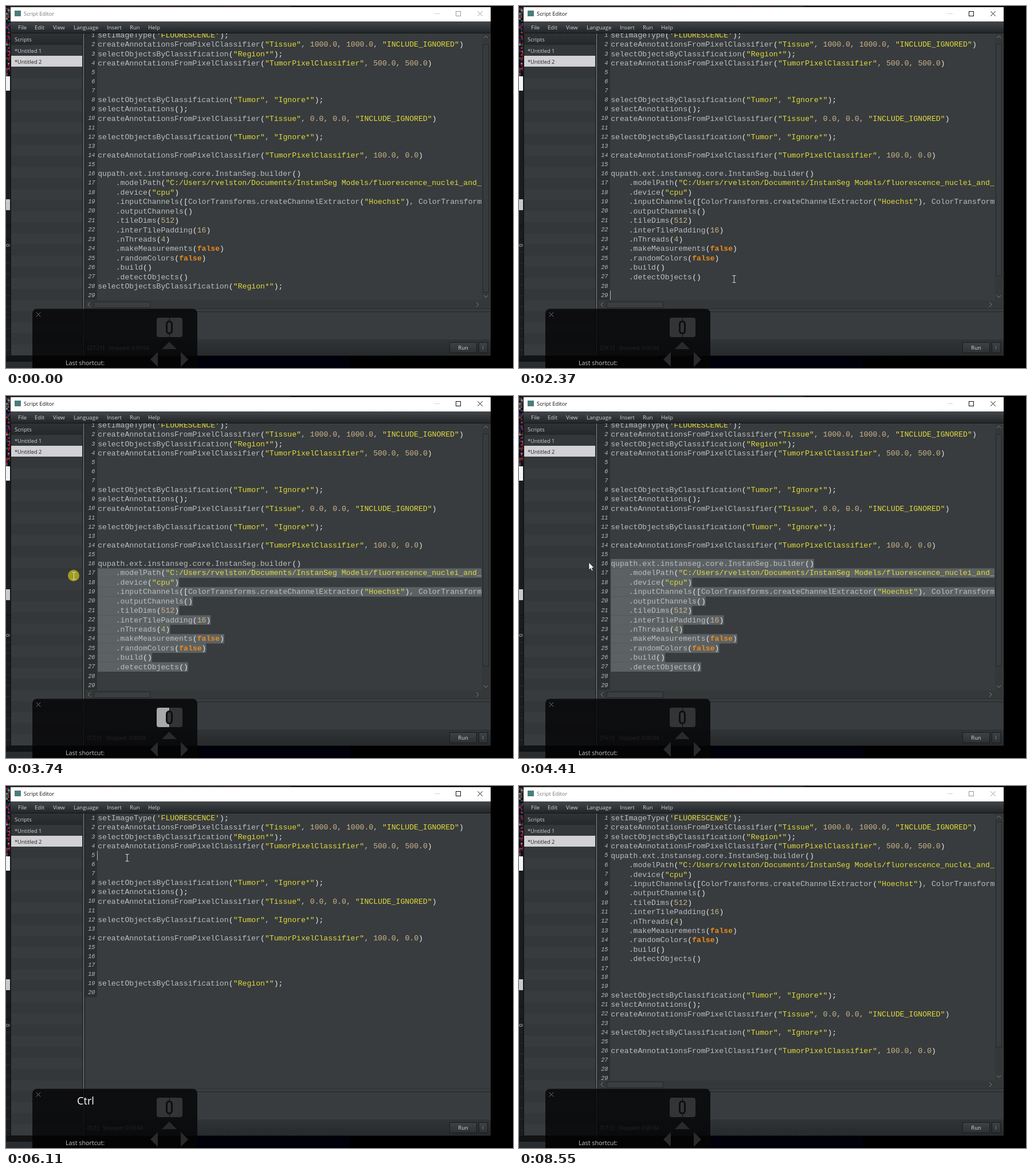
An HTML page with a canvas that plays this animation: 885 by 633 pixels, repeating every 8620 ms.

```html
<!DOCTYPE html>
<html lang="en">
<head>
<meta charset="utf-8">
<title>Script Editor</title>
<style>
html, body { margin: 0; width: 100%; height: 100%; overflow: hidden; background: #000; }
canvas { display: block; width: 885px; height: 633px; }
</style>
</head>
<body>
<canvas id="stage" width="885" height="633"></canvas>
<script>
const ctx = document.getElementById('stage').getContext('2d');
const LOOP = 8620;
const UI = '"Open Sans", "Noto Sans", sans-serif';
const MONO = '"Liberation Mono", "Courier New", monospace';
const CODE_X = 160.2, CHAR = 7.885, CODE_SIZE = 13.14;
const TOP = 48, ROW = 16.42, BLANK = 15.7, VIEW = 466;

// ---------- script text ----------
const open = [
  "setImageType('FLUORESCENCE');",
  'createAnnotationsFromPixelClassifier("Tissue", 1000.0, 1000.0, "INCLUDE_IGNORED")',
  'selectObjectsByClassification("Region*");',
  'createAnnotationsFromPixelClassifier("TumorPixelClassifier", 500.0, 500.0)'
];
const middle = [
  'selectObjectsByClassification("Tumor", "Ignore*");',
  'selectAnnotations();',
  'createAnnotationsFromPixelClassifier("Tissue", 0.0, 0.0, "INCLUDE_IGNORED")',
  '',
  'selectObjectsByClassification("Tumor", "Ignore*");',
  '',
  'createAnnotationsFromPixelClassifier("TumorPixelClassifier", 100.0, 0.0)',
  ''
];
const builder = [
  'qupath.ext.instanseg.core.InstanSeg.builder()',
  '    .modelPath("C:/Users/rvelston/Documents/InstanSeg Models/fluorescence_nuclei_and_cells")',
  '    .device("cpu")',
  '    .inputChannels([ColorTransforms.createChannelExtractor("Hoechst"), ColorTransforms.create',
  '    .outputChannels()',
  '    .tileDims(512)',
  '    .interTilePadding(16)',
  '    .nThreads(4)',
  '    .makeMeasurements(false)',
  '    .randomColors(false)',
  '    .build()',
  '    .detectObjects()'
];
const tail = ['selectObjectsByClassification("Region*");', ''];
const gap = n => Array(n).fill('');

const before = n => makeDoc([...open, ...gap(3), ...middle, ...builder, ...gap(n), ...tail], 5);
const after = n => makeDoc([...open, ...builder, ...gap(n), ...middle, ...gap(3), ...tail], 0);
const cut = makeDoc([...open, ...gap(3), ...middle, ...gap(3), ...tail], 0);

function makeDoc(lines, scroll) {
  const tops = [];
  let y = TOP - scroll;
  for (const s of lines) { tops.push(y); y += s ? ROW : BLANK; }
  tops.push(y);
  return { lines, tops, scroll, height: y + scroll - TOP };
}

// time, document, caret line, caret column
const states = [
  [0, before(0), 27, 20], [2160, before(1), 28, 0], [2300, before(2), 29, 0],
  [4670, cut, 16, 0], [5580, cut, 5, 0], [6180, after(2), 16, 20], [7110, after(3), 17, 0]
];
const last = (list, t) => list.filter(s => s[0] <= t).pop();
const within = (t, spans) => spans.some(([a, b]) => t >= a && t < b);

// ---------- motion ----------
const pointerPath = [
  [260, 515, 552], [680, 371, 468], [890, 375, 477], [2830, 375, 477], [2970, 345, 476],
  [3110, 290, 462], [3320, 193, 399], [3670, 120, 319], [3740, 118, 314], [3950, 120, 293],
  [4210, 122, 292], [4950, 122, 292], [5510, 211, 125], [7590, 211, 125], [8220, 830, 640]
];
const headPath = [
  [2970, 345, 476], [3110, 318, 472], [3320, 217, 410], [3670, 120, 327],
  [3740, 118, 312], [3880, 118, 294]
];
const presses = [[1150, 1350], [2970, 4210], [5580, 5720]];
const caretOn = [[1150, 1960], [2160, 2830], [4670, 5170], [5650, 6650], [7110, 7590]];
const DRAG = [2970, 4670];

function along(path, t) {
  let i = 0;
  while (i < path.length - 2 && t > path[i + 1][0]) i++;
  const a = path[i], b = path[i + 1];
  const k = Math.min(1, Math.max(0, (t - a[0]) / (b[0] - a[0])));
  return [a[1] + (b[1] - a[1]) * k, a[2] + (b[2] - a[2]) * k];
}
function stepped(t) {
  const start = last([[0], [260], [2830], [4670], [7590]], t)[0];
  return start + Math.floor((t - start + 10) / 70) * 70;
}

// ---------- drawing helpers ----------
function box(x, y, w, h, fill) { ctx.fillStyle = fill; ctx.fillRect(x, y, w, h); }
function ramp(x, y, w, h, a, b) {
  const g = ctx.createLinearGradient(0, y, 0, y + h);
  g.addColorStop(0, a);
  g.addColorStop(1, b);
  box(x, y, w, h, g);
}
function frame(x, y, w, h, color) {
  ctx.strokeStyle = color;
  ctx.lineWidth = 1;
  ctx.strokeRect(x + .5, y + .5, w - 1, h - 1);
}
function text(s, x, y, size, color, align = 'left') {
  ctx.font = `${size}px ${UI}`;
  ctx.textAlign = align;
  ctx.fillStyle = color;
  ctx.fillText(s, x, y);
}
function line(points, color, width = 1) {
  ctx.strokeStyle = color;
  ctx.lineWidth = width;
  ctx.beginPath();
  points.forEach(([x, y], i) => i ? ctx.lineTo(x, y) : ctx.moveTo(x, y));
  ctx.stroke();
}
function shape(points, color) {
  ctx.fillStyle = color;
  ctx.beginPath();
  points.forEach(([x, y]) => ctx.lineTo(x, y));
  ctx.closePath();
  ctx.fill();
}
function round(x, y, w, h, r, color) {
  ctx.fillStyle = color;
  ctx.beginPath();
  ctx.roundRect(x, y, w, h, r);
  ctx.fill();
}
function cross(x, y, r, color) {
  line([[x - r, y - r], [x + r, y + r]], color);
  line([[x + r, y - r], [x - r, y + r]], color);
}

// ---------- parts ----------
function drawDesktop() {
  box(0, 0, 885, 633, '#000');
  box(334, 613, 266, 20, '#01010c');
  box(0, 0, 8, 633, '#1a1d1e');
  let seed = 7;
  const rnd = () => (seed = seed * 16807 % 2147483647) / 2147483647;
  const tints = ['#0a0c1c', '#8e161c', '#182050', '#a8242a', '#1c0c14', '#24503a', '#7c7c8c', '#0c1020'];
  const tint = () => tints[Math.floor(rnd() * tints.length)];
  for (let y = 0; y < 122; y += 3)
    for (let x = 0; x < 8; x += 3) box(x, y, Math.min(3, 8 - x), 3, tint());
  for (let x = 8; x < 495; x += 3) box(x, 0, 3, 1, rnd() < .5 ? '#5a1418' : '#15301c');
  box(0, 123, 8, 25, '#f4f4f4');
  box(0, 338, 8, 19, '#c9c9c9');
  for (const y of [383, 387, 407]) box(0, y, 8, 1, '#0c0d0e');
  for (let y = 430; y < 610; y += 19) box(0, y, 8, 1, '#2b2e30');
  text('or', 0, 421, 9.5, '#c8c8c8');
  box(0, 612, 46, 21, '#111314');
  box(0, 622, 46, 11, '#2a2d2f');
}

function drawWindow(active) {
  box(7, 1, 839, 611, '#141617');
  box(8, 2, 838, 25, '#fff');
  const ink = active ? '#111' : '#999';
  box(15, 8, 11, 10, '#4b7d7b');
  text('Script Editor', 31, 17, 9.35, active ? '#111' : '#777');
  box(748, 13, 9, 1, '#d0d0d0');
  frame(785, 9, 9, 9, ink);
  cross(827.5, 13.5, 4.2, ink);

  ramp(8, 27, 838, 20, '#43474a', '#232628');
  const menus = { File: 21, Edit: 50, View: 82, Language: 118, Insert: 176, Run: 216, Help: 248 };
  for (const name in menus) text(name, menus[name], 40.5, 9.6, '#d2d3d4');

  box(9, 48, 124, 563, '#373b3d');
  ramp(9, 48, 124, 20, '#303335', '#25282a');
  text('Scripts', 15, 62, 9.5, '#d0d1d2');
  for (let i = 0; i < 28; i++) {
    const y = 68 + i * 19.4;
    box(9, y, 124, Math.min(19.4, 611 - y), i % 2 ? '#373b3d' : '#33373a');
  }
  box(9, 87, 124, 19, '#d2d1d4');
  text('*Untitled 1', 15, 81.5, 9.25, '#d0d1d2');
  text('*Untitled 2', 15, 100.5, 9.25, '#222');

  box(133, 48, 5, 563, '#1d2021');
  box(134, 48, 3, 563, '#3c4042');
  box(135, 48, 1, 563, '#6c7072');
  box(138, 48, 708, 482, '#383c3e');
  box(138, 530, 708, 5, '#1d2021');
  box(138, 531, 708, 1, '#5f6365');
  box(138, 533, 708, 1, '#4a4e50');
  box(138, 535, 708, 48, '#383c3e');
  ramp(138, 583, 708, 28, '#303436', '#272a2c');
  ramp(774, 588, 48, 19, '#3f4345', '#2d3032');
  frame(774, 588, 48, 19, '#1a1c1d');
  text('Run', 798, 601, 9.4, '#dcdcdc', 'center');
  ramp(825, 588, 16, 19, '#3f4345', '#2d3032');
  frame(825, 588, 16, 19, '#1a1c1d');
  for (const y of [595, 597, 599]) box(832, y, 1, 1, '#b5b5b5');
}

function drawBars(doc) {
  const grey = '#7c8082', edge = '#25282a';
  box(831, 48, 14, 467, '#343839');
  line([[834, 56], [837.5, 52], [841, 56]], grey);
  line([[834, 506], [837.5, 510], [841, 506]], grey);
  const y = 62 + 439 * doc.scroll / doc.height, h = 439 * VIEW / doc.height;
  box(832, y, 11, h, '#373b3d');
  frame(832, Math.round(y), 11, Math.round(h), edge);
  box(138, 515, 707, 15, '#343839');
  line([[147, 518], [143, 522], [147, 526]], grey);
  line([[821, 518], [825, 522], [821, 526]], grey);
  box(153, 517, 99, 11, '#3a3e40');
  frame(153, 517, 99, 11, edge);
}

const TOKEN = /"[^"]*"|'[^']*'|\b\d+(?:\.\d+)?\b|\bfalse\b|[()[\]{};]|[^"'()[\]{};\d]+?(?=\bfalse\b|["'()[\]{};\d]|$)/g;
function style(tok) {
  if (/^["']/.test(tok)) return ['', '#e2da3c'];
  if (/^\d/.test(tok)) return ['', '#cdb388'];
  if (tok === 'false') return ['bold ', '#ec8a1c'];
  if (/^[()[\]{};]/.test(tok)) return ['', '#e6e7e7'];
  return ['', '#bcbebf'];
}

function drawCode(doc, bars, sel, caret) {
  const { lines, tops } = doc;
  ctx.save();
  ctx.beginPath();
  ctx.rect(138, TOP, bars ? 692 : 708, bars ? VIEW : 482);
  ctx.clip();
  box(138, TOP, 21, tops[lines.length] - TOP, '#2c2f31');
  lines.forEach((s, i) => {
    const y = tops[i], n = i + 1;
    if (sel && n >= sel.line && n <= 27) {
      const from = n === sel.line ? sel.col : 0;
      box(CODE_X + from * CHAR, y, (s.length - from) * CHAR, ROW, '#5c6264');
    }
    ctx.font = `italic 10.3px ${MONO}`;
    ctx.textAlign = 'right';
    ctx.fillStyle = '#b9bbbc';
    ctx.fillText(n, 155.5, Math.round(y + 10.8));
    ctx.textAlign = 'left';
    for (const m of s.matchAll(TOKEN)) {
      const [weight, color] = style(m[0]);
      ctx.font = `${weight}${CODE_SIZE}px ${MONO}`;
      ctx.fillStyle = color;
      ctx.fillText(m[0], CODE_X + m.index * CHAR, Math.round(y + 12));
    }
  });
  if (caret) box(Math.floor(CODE_X + caret.col * CHAR - .5), tops[caret.line - 1], 1, ROW, '#b4b6b7');
  ctx.restore();
}

function drawStatus(pos) {
  const s = `[${pos.line}:${pos.col + 1}]`;
  text(s, 142, 601, 9.3, '#c4c4c4');
  const x = 142 + ctx.measureText(s).width + 8;
  text('Stopped: 0:00:04', x, 601, 8.95, '#c4c4c4');
}

function drawKeys(t, pressed) {
  round(46, 529.5, 288, 120, 8, 'rgba(5,6,7,.83)');
  cross(56.5, 539.5, 3.8, '#77797a');
  const dim = '#323435', arrow = '#282a2b';
  round(263, 545, 22, 34, [4, 0, 0, 4], pressed ? '#a8a9a9' : dim);
  round(286, 545, 22, 34, [0, 4, 4, 0], dim);
  round(279, 550, 12, 24, 6, '#0d0e0f');
  round(282, 553, 6, 18, 3, dim);
  shape([[285, 587], [298, 600], [272, 600]], arrow);
  shape([[252, 618], [265, 605], [265, 631]], arrow);
  shape([[318, 618], [305, 605], [305, 631]], arrow);
  text('Last shortcut:', 104, 628, 10.75, '#c6c6c6');

  if (within(t, [[4670, 4880], [6110, 6320]])) text('Ctrl', 139, 557, 18.2, '#fff', 'center');
  let key = '';
  if (within(t, [[4670, 4810]])) key = 'X';
  if (within(t, [[6180, 6250]])) key = 'V';
  if (within(t, [[2160, 2230], [2300, 2370], [7110, 7180]])) key = 'Enter';
  if (key) text(key, 139, 600.5, 24, '#fff', 'center');
}

function drawPointer(t, dragging) {
  if (t < 260 || t >= 8220) return;
  const [x, y] = along(pointerPath, stepped(t));
  const press = presses.filter(p => t >= p[0]).pop();
  const glow = press ? Math.min(1, Math.max(0, 1 - (t - press[1]) / 200)) : 0;
  if (glow) {
    ctx.fillStyle = `rgba(182,174,28,${.85 * glow})`;
    ctx.beginPath();
    ctx.arc(x, y, 10, 0, 7);
    ctx.fill();
  }
  if (dragging || (x > 160 && x < 830 && y > 48 && y < 514)) {
    const cx = Math.round(x) + .5, cy = Math.round(y);
    line([[cx, cy - 6], [cx, cy + 6]], '#d8d8d8');
    for (const dy of [-6, 6]) line([[cx - 3, cy + dy + .5], [cx + 3, cy + dy + .5]], '#d8d8d8');
  } else {
    const tip = [[0, 0], [0, 13], [3, 10.4], [5, 15], [7.2, 14], [5.2, 9.6], [9, 9.4]]
      .map(([a, b]) => [x + a, y + b - 1]);
    shape(tip, '#fff');
    line([...tip, tip[0]], '#111', .7);
  }
}

function render(t) {
  const [, doc, row, column] = last(states, t);
  const dragging = within(t, [DRAG]);
  let pos = { line: row, col: column };
  if (dragging) {
    const [x, y] = along(headPath, stepped(t));
    const n = Math.min(27, doc.tops.filter(v => v <= y).length);
    const col = Math.min(doc.lines[n - 1].length, Math.max(0, Math.round((x - CODE_X) / CHAR)));
    pos = { line: n, col };
  }
  const bars = !within(t, [[4740, 6180]]);
  const pressed = within(t, presses);

  drawDesktop();
  drawWindow(t >= 1150 && t < 8550);
  drawCode(doc, bars, dragging && pos, within(t, caretOn) && pos);
  // the bars linger for a moment after the cut
  if (bars) drawBars(within(t, [[4670, 4740]]) ? states[2][1] : doc);
  drawStatus(pos);
  drawKeys(t, pressed);
  drawPointer(t, within(t, [[2970, 4280]]));
}

const began = performance.now();
function tick() {
  render((performance.now() - began) % LOOP);
  requestAnimationFrame(tick);
}
tick();
</script>
</body>
</html>
```
